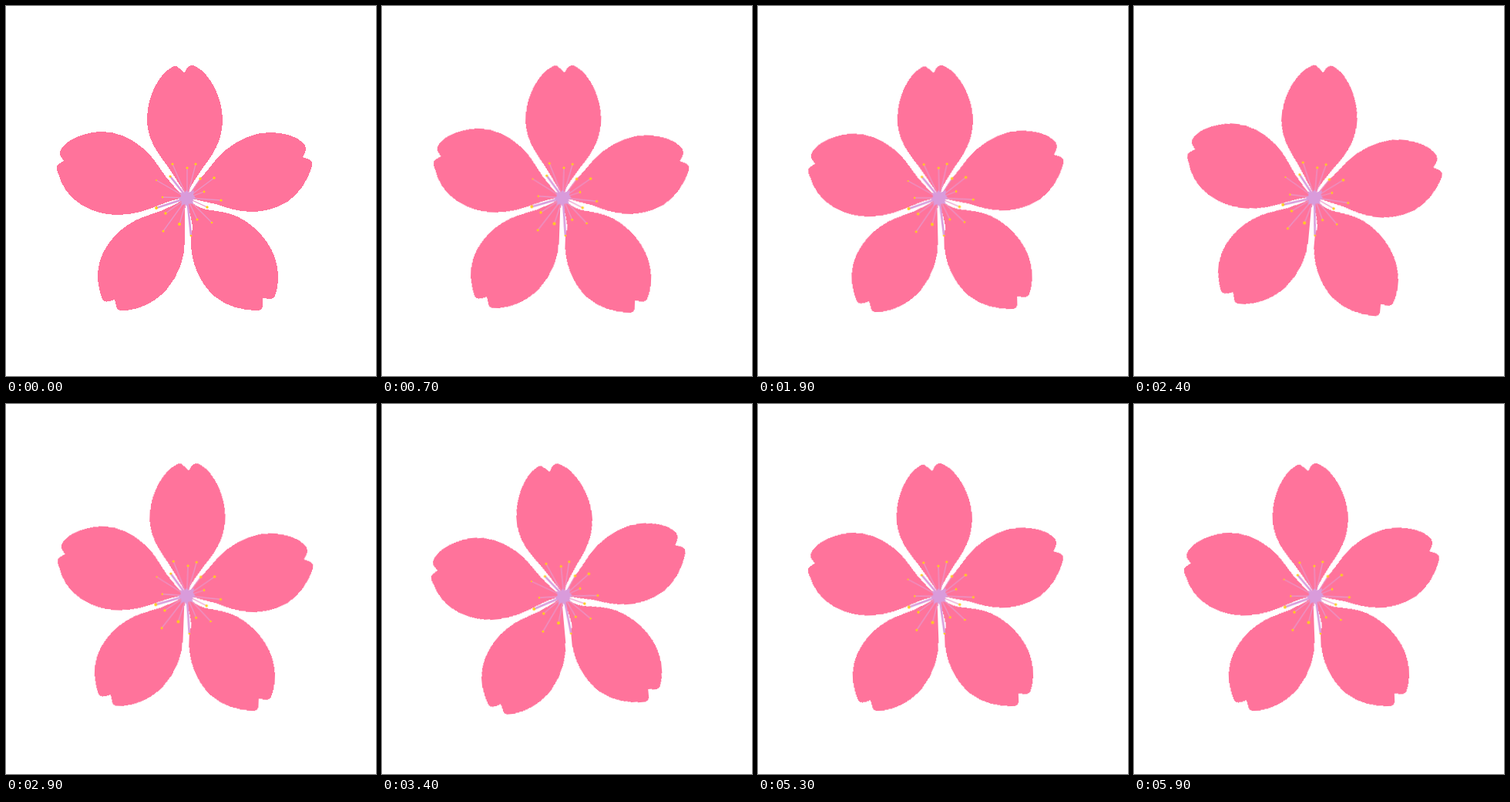
Animation, 480 px wide and 480 px high, one loop 6 s. Source, as an HTML page:

```html
<!DOCTYPE html>
<html lang="en">
<head>
<meta charset="utf-8">
<title>Swaying blossom</title>
<style>
  html, body { margin: 0; width: 100%; height: 100%; overflow: hidden; background: #fff; }
  svg { display: block; width: 100vw; height: 100vh; }
  #flower { transform-origin: 240px 240px; animation: sway 6s infinite; }
  .petals { fill: #ff739b; shape-rendering: crispEdges; }
  .thin { stroke: #ea94c6; stroke-width: 1.3; }
  .thick { stroke: #d99bdb; stroke-width: 2.6; }
  .anther { fill: #ffcf1a; }
  .heart { fill: #d99bdb; }

  /* each pose lasts a tenth of a second */
  @keyframes sway {
    0%      { transform: rotate(0deg); animation-timing-function: steps(2); }
    3.3333% { transform: rotate(3.5deg); animation-timing-function: steps(2); }
    6.6667% { transform: rotate(5.2deg); animation-timing-function: steps(3); }
    11.6667% { transform: rotate(2deg); animation-timing-function: steps(3); }
    16.6667%, 18.3333% { transform: rotate(0deg); animation-timing-function: steps(3); }
    23.3333%, 26.6667% { transform: rotate(-5.2deg); animation-timing-function: steps(4); }
    33.3333%, 35% { transform: rotate(0deg); animation-timing-function: steps(3); }
    40%, 43.3333% { transform: rotate(5.2deg); animation-timing-function: steps(7); }
    55%     { transform: rotate(-2deg); animation-timing-function: steps(1); }
    56.6667%, 60% { transform: rotate(-5.2deg); animation-timing-function: steps(7); }
    71.6667%, 73.3333% { transform: rotate(2deg); animation-timing-function: steps(1); }
    75%, 78.3333% { transform: rotate(5.2deg); animation-timing-function: steps(4); }
    85%, 86.6667% { transform: rotate(0deg); animation-timing-function: steps(1); }
    88.3333% { transform: rotate(-2deg); animation-timing-function: steps(2); }
    91.6667%, 95% { transform: rotate(-5.2deg); animation-timing-function: steps(2); }
    98.3333% { transform: rotate(-2deg); animation-timing-function: steps(1); }
    100%    { transform: rotate(0deg); }
  }
</style>
</head>
<body>
<svg viewBox="0 0 480 480">
  <g id="flower">
    <g class="petals">
      <path d="M234 246C226 232 216 218 209 207C196 190 183 172 183 147C183 118 198 88 216 79Q221 76 225 81L231 87L236 79Q241 75 247 79C264 88 281 118 281 148C281 176 266 196 256 209C248 221 240 232 234 246Z"/>
      <path d="M236 248C244 235 250 225 258 217C268 206 273 196 286 186C302 173 322 164 342 164C359 164 376 168 386 178Q391 184 388 190L385 196L393 199Q399 202 397 208C392 226 380 244 365 254C350 263 335 267 319 267C301 267 287 262 272 257C260 254 246 252 236 248Z"/>
      <path d="M235 249C242 257 250 262 260 264C274 266 290 268 302 274C331 289 353 319 353 350C353 360 352 368 349 376Q347 380 342 380L333 379L333 388Q333 395 325 395C308 395 286 390 271 377C251 360 240 333 240 306C240 297 242 291 242 286C240 272 236 262 235 249Z"/>
      <path d="M234 249C225 255 214 260 203 265C188 271 172 274 158 284C134 300 119 325 119 350C119 361 122 373 125 380Q128 385 134 383L141 381L143 389Q144 396 152 395C172 395 196 383 209 367C224 349 232 328 232 304C232 285 231 268 234 249Z"/>
      <path d="M234 248C224 242 216 232 207 221C197 208 192 196 177 184C163 172 145 163 125 163C106 163 83 171 73 183Q68 190 71 195L75 201L68 205Q64 208 67 215C71 232 82 249 98 258C113 267 129 271 145 271C167 271 185 264 197 259C210 254 222 250 234 248Z"/>
    </g>
    <g id="stamens"></g>
    <path class="heart" d="M226 242L231 243L234 239L237 242L244 239L243 245L246 249L242 252L243 257L238 256L235 260L232 257L227 259L228 254L224 250L227 247Z"/>
  </g>
</svg>
<script>
  const cx = 235, cy = 249;
  // x, y, anther radius
  const thin = [
    [216, 205, 1.6], [235, 210, 1.6], [246, 205, 1.6], [195, 226, 1],
    [252, 224, 1.7], [270, 223, 1.8], [257, 241, 1.4], [279, 252, 1.6],
    [261, 261, 1.7], [267, 281, 1.3], [248, 277, 1.5], [225, 283, 2],
    [204, 292, 1.5], [207, 269, 1.7], [203, 248, 1.2]
  ];
  const thick = [[213, 221, 1.6], [195, 262, 1.9], [240, 298, 1.3]];

  const draw = (list, kind) => list.map(([x, y, r]) =>
    `<line class="${kind}" x1="${cx}" y1="${cy}" x2="${x}" y2="${y}"/>` +
    `<circle class="anther" cx="${x}" cy="${y}" r="${r}"/>`).join("");

  document.getElementById("stamens").innerHTML = draw(thick, "thick") + draw(thin, "thin");
</script>
</body>
</html>
```
